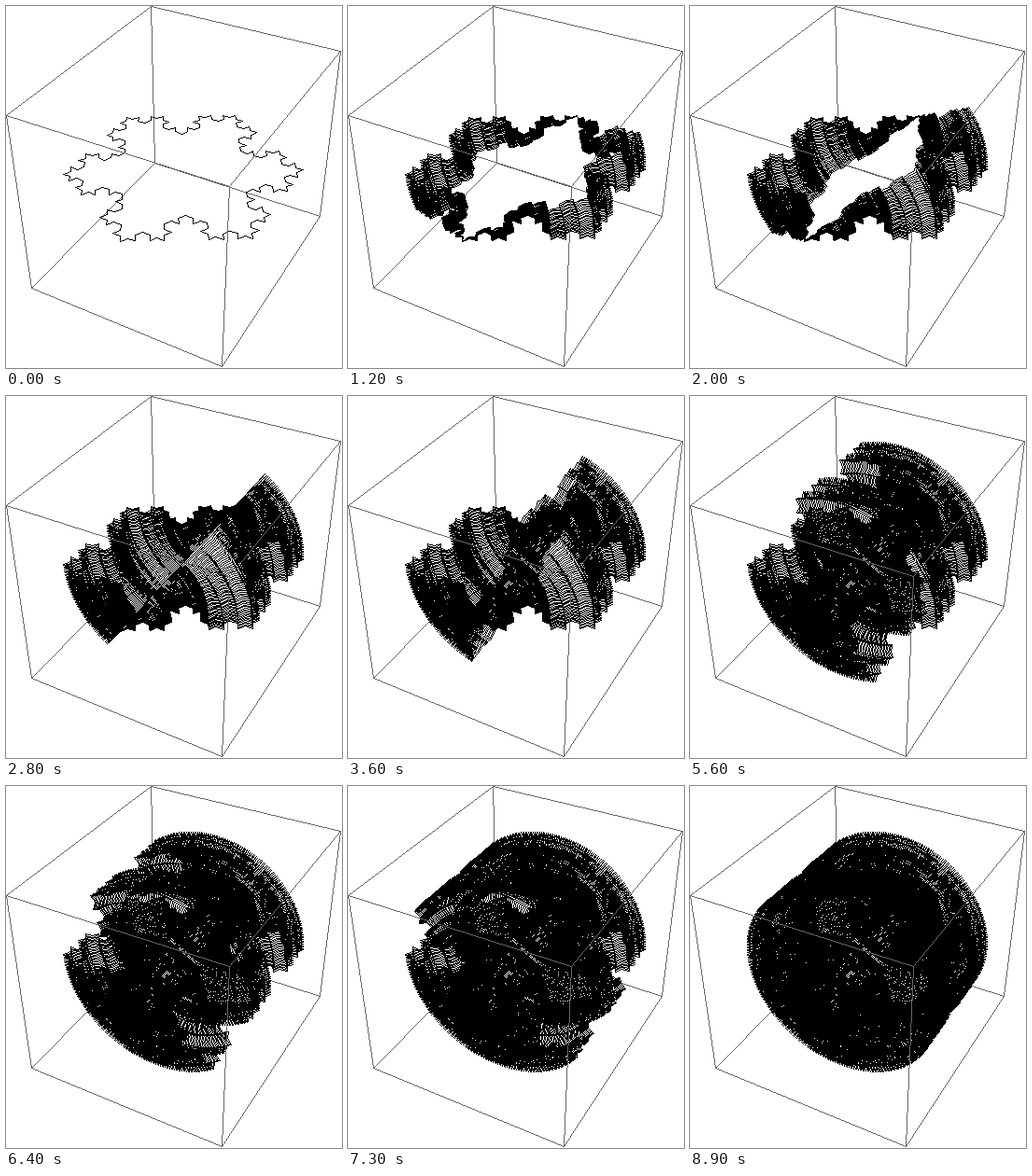
Write a matplotlib script that moves like this. It is 360 by 388 pixels and loops after 9000 ms.

```python
import itertools

import matplotlib.pyplot as plt
import numpy as np
from matplotlib.animation import FuncAnimation

W, H, DPI = 360, 388, 100
FRAMES, INTERVAL = 90, 100
COPIES = 2                                   # curves added per frame
RADIUS = 0.48                                # centre to tip of the snowflake
HALF = np.array([0.433, 0.5, 0.4175])        # half sizes of the box
EYE = np.array([1.3, -2.4, 2.0])
SCALE, CENTRE = 904, (190.25, 178.05)
WHITE, GRAY, BLACK = 255, 102, 0

DIST = np.linalg.norm(EYE)
FORWARD = EYE / DIST
RIGHT = np.cross([0, 0, 1], FORWARD)
RIGHT /= np.linalg.norm(RIGHT)
UP = np.cross(FORWARD, RIGHT)


def project(points):
    """Perspective view of 3D points in stage pixels."""
    depth = DIST - points @ FORWARD
    x = CENTRE[0] + SCALE * (points @ RIGHT) / depth
    y = CENTRE[1] - SCALE * (points @ UP) / depth
    return np.stack([x, y], axis=-1)


def snowflake(radius, order):
    """Closed Koch snowflake as complex points, tips on the y axis."""
    pts = radius * np.exp(1j * np.radians([90, -30, -150, 90]))
    for _ in range(order):
        a, step = pts[:-1], np.diff(pts) / 3
        peak = a + step + step * np.exp(1j * np.pi / 3)
        parts = np.stack([a, a + step, peak, a + 2 * step], axis=1)
        pts = np.append(parts.ravel(), pts[-1])
    return pts


def turned(curve, angle):
    """The flat curve rotated about the y axis."""
    return np.stack([curve.real * np.cos(angle), curve.imag,
                     curve.real * np.sin(angle)], axis=-1)


def stroke(mask, points):
    """Mark a hard-edged polyline, one pixel wide."""
    pix = np.floor(project(points))
    start, delta = pix[:-1], np.diff(pix, axis=0)
    steps = np.maximum(np.abs(delta).max(axis=1), 1)[:, None]
    t = np.minimum(np.arange(steps.max() + 1), steps) / steps
    line = start[:, None] + delta[:, None] * t[..., None]
    x, y = np.floor(line + 0.5).astype(int).reshape(-1, 2).T
    mask[np.clip(y, 0, H - 1), np.clip(x, 0, W - 1)] = True


def box_masks():
    """Box edges behind and in front of the solid."""
    back, front = np.zeros((2, H, W), bool)
    hidden = (-1, 1, -1)
    for a, b in itertools.combinations(itertools.product((-1, 1), repeat=3), 2):
        if sum(i != j for i, j in zip(a, b)) == 1:
            stroke(back if hidden in (a, b) else front, np.array([a, b]) * HALF)
    return back, front


def trail_masks():
    """Everything swept by the curve up to each frame."""
    flake = snowflake(RADIUS, 3)
    angles = np.linspace(0, np.pi, COPIES * (FRAMES - 1) + 1)
    masks = np.zeros((FRAMES, H, W), bool)
    for k, angle in enumerate(angles):
        stroke(masks[-(-k // COPIES)], turned(flake, angle))
    return np.logical_or.accumulate(masks)


back, front = box_masks()
trails = trail_masks()


def picture(i):
    img = np.full((H, W), WHITE, np.uint8)
    for mask, tone in ((back, GRAY), (trails[i], BLACK), (front, GRAY)):
        img[mask] = tone
    return img


fig = plt.figure(figsize=(W / DPI, H / DPI), dpi=DPI, facecolor="white")
ax = fig.add_axes([0, 0, 1, 1])
ax.axis("off")
stage = ax.imshow(picture(0), cmap="gray", vmin=0, vmax=255,
                  interpolation="nearest", aspect="auto")


def update(i):
    stage.set_data(picture(i))
    return (stage,)


anim = FuncAnimation(fig, update, frames=FRAMES, interval=INTERVAL,
                     repeat=True, repeat_delay=0)
plt.show()
```
